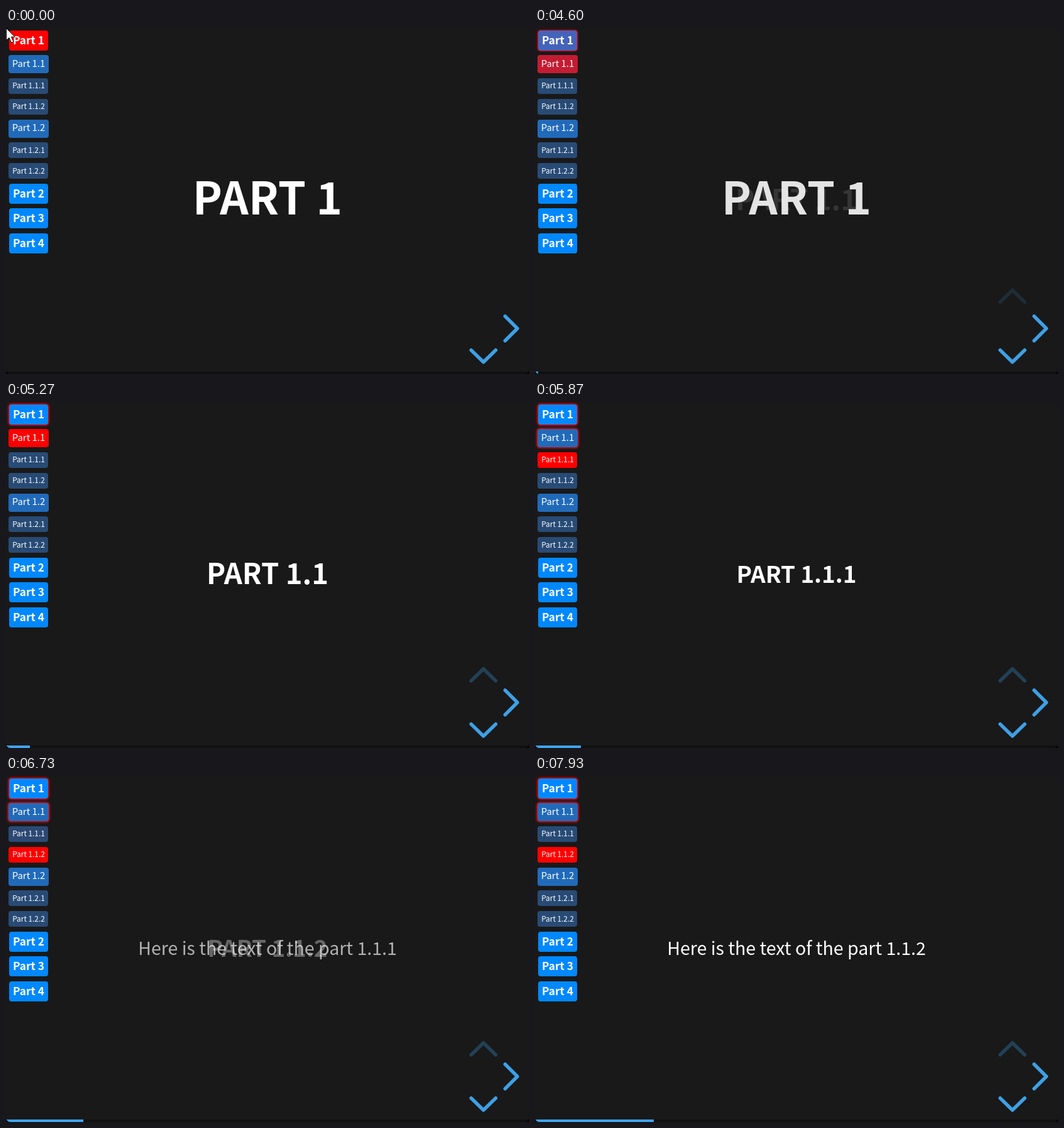
These frames come from a looping animation (832 px wide and 551 px high, 8 s). An HTML page:

```html
<!DOCTYPE html>
<html lang="en">
<head>
<meta charset="utf-8">
<title>Slides with a part menu</title>
<style>
  html, body { margin: 0; width: 100%; height: 100%; overflow: hidden; background: #000; }
  #stage {
    position: relative; width: 832px; height: 551px; overflow: hidden;
    background: #191919; border-radius: 0 0 7px 7px;
  }
  #stage > * { position: absolute; }
  .part { border-radius: 4px; }
  #track { left: 0; top: 547px; width: 832px; height: 4px; background: rgba(0, 0, 0, .3); }
  #bar { height: 4px; background: #3fa4f0; }
  svg { left: 0; top: 0; }
  text {
    font-family: "Noto Sans CJK JP", "Noto Sans CJK SC", "Noto Sans CJK", "Noto Sans", sans-serif;
    fill: #fff; text-anchor: middle;
  }
  .bold { font-weight: 600; }
  .arrow { fill: none; stroke: #3ea0e5; stroke-width: 5.5; stroke-linecap: round; stroke-linejoin: round; }
</style>
</head>
<body>
<div id="stage">
  <div id="track"><div id="bar"></div></div>
  <svg id="art" width="832" height="551" viewBox="0 0 832 551">
    <path class="arrow" d="M794 459L813.5 478.5L794 498"/>
    <path class="arrow" d="M740 513L759.5 532L779 513"/>
    <path class="arrow" id="up" d="M740 444L759.5 425L779 444"/>
    <path id="cursor" d="M.5 .5V19.5L5 15.5L8.5 23.5L12 22L8.5 14.2H14.3Z" fill="#fff" stroke="#000"/>
  </svg>
</div>
<script>
const LOOP = 8000, STEP = 200 / 3;
const SLIDE_COUNT = 22, WIDTH = 832;
const RED = [255, 0, 0];

// Menu levels: left, width, height, font size, colour
const LEVELS = [
  { x: 5, w: 62, h: 32, size: 17.3, color: [0, 136, 255], cls: "bold" },
  { x: 4, w: 64, h: 29, size: 14.85, color: [33, 106, 186], cls: "" },
  { x: 4, w: 63, h: 25, size: 11.85, color: [40, 75, 117], cls: "" }
];
// Menu entries: number, top, middle of the label
const PARTS = [
  ["1", 4, 19.7], ["1.1", 43, 57], ["1.1.1", 80, 92], ["1.1.2", 113, 125],
  ["1.2", 146, 159], ["1.2.1", 182, 195], ["1.2.2", 215, 228],
  ["2", 248, 264], ["3", 287, 303], ["4", 327, 343]
];
// Slides: start, text, size, baseline, active entry, number of lit parents
const SLIDES = [
  { at: -2000, text: "PART 1", size: 71, y: 296.7, part: 0, lit: 0 },
  { at: 4565, text: "PART 1.1", size: 45.4, y: 289.5, part: 1, lit: 1 },
  { at: 5430, text: "PART 1.1.1", size: 36.8, y: 287.6, part: 2, lit: 2 },
  { at: 6050, text: "Here is the text of the part 1.1.1", size: 28.5, y: 285, part: 2, lit: 2 },
  { at: 6668, text: "PART 1.1.2", size: 36.8, y: 287.6, part: 3, lit: 2 },
  { at: 7280, text: "Here is the text of the part 1.1.2", size: 28.5, y: 285, part: 3, lit: 2 }
];

const $ = id => document.getElementById(id);
const clamp = v => Math.min(1, Math.max(0, v));
const mix = (a, b, k) => a + (b - a) * k;

function bezier(x1, y1, x2, y2) {
  const curve = (a, b, s) => 3 * (1 - s) * (1 - s) * s * a + 3 * (1 - s) * s * s * b + s * s * s;
  return x => {
    if (x <= 0 || x >= 1) return clamp(x);
    let lo = 0, hi = 1;
    for (let i = 0; i < 24; i++) {
      const mid = (lo + hi) / 2;
      if (curve(x1, x2, mid) < x) lo = mid; else hi = mid;
    }
    return curve(y1, y2, lo);
  };
}
const ease = bezier(.25, .1, .25, 1);
const glide = bezier(.26, .86, .44, .985);

function addText(str, x, y, size, cls) {
  const el = document.createElementNS("http://www.w3.org/2000/svg", "text");
  el.textContent = str;
  el.setAttribute("x", x);
  el.setAttribute("y", y);
  el.setAttribute("font-size", size);
  if (cls) el.setAttribute("class", cls);
  $("art").insertBefore(el, $("cursor"));
  return el;
}

const boxes = PARTS.map(([num, top, mid]) => {
  const level = LEVELS[num.split(".").length - 1];
  const el = document.createElement("div");
  el.className = "part";
  el.style.cssText = `left:${level.x}px;top:${top}px;width:${level.w}px;height:${level.h}px`;
  $("stage").insertBefore(el, $("art"));
  addText("Part " + num, 36, mid + level.size * .366, level.size, level.cls);
  return { el, color: level.color };
});
const titles = SLIDES.map(s =>
  addText(s.text, 416, s.y, s.size, s.text.startsWith("PART") ? "bold" : ""));

// Value that follows the slides, each change eased from where it stood
function follow(t, value, ms, curve) {
  let v = value(SLIDES[0], 0);
  for (let i = 1; i < SLIDES.length && SLIDES[i].at <= t; i++) {
    const end = i + 1 < SLIDES.length ? Math.min(t, SLIDES[i + 1].at) : t;
    v = mix(v, value(SLIDES[i], i), curve(clamp((end - SLIDES[i].at) / ms)));
  }
  return v;
}

function draw(time) {
  const t = Math.floor((time + 4) / STEP) * STEP;

  titles.forEach((el, i) => {
    el.style.opacity = follow(t, (s, n) => n === i ? 1 : 0, 300, ease);
  });

  boxes.forEach(({ el, color }, i) => {
    const on = follow(t, s => s.part === i ? 1 : 0, 80, ease);
    const glow = follow(t, s => i < s.lit ? 1 : 0, 80, ease);
    el.style.background = `rgb(${color.map((c, k) => Math.round(mix(c, RED[k], on)))})`;
    el.style.boxShadow = glow ? `0 0 ${3 * glow}px ${1.5 * glow}px #f00` : "none";
  });

  $("bar").style.width = follow(t, (s, n) => n * WIDTH / SLIDE_COUNT, 800, glide) + "px";

  const since = t - SLIDES[1].at;
  $("up").style.opacity = .3 * ease(clamp(since / 120));
  $("up").setAttribute("transform", `translate(0 ${-10 * (1 - ease(clamp(since / 200)))})`);

  $("cursor").style.display = time < 1196 ? "" : "none";
  $("cursor").setAttribute("transform", time < 1126 ? "translate(0 0)" : "translate(-4 -7)");
}

const began = performance.now();
function tick() {
  draw((performance.now() - began) % LOOP);
  requestAnimationFrame(tick);
}
tick();
</script>
</body>
</html>
```
